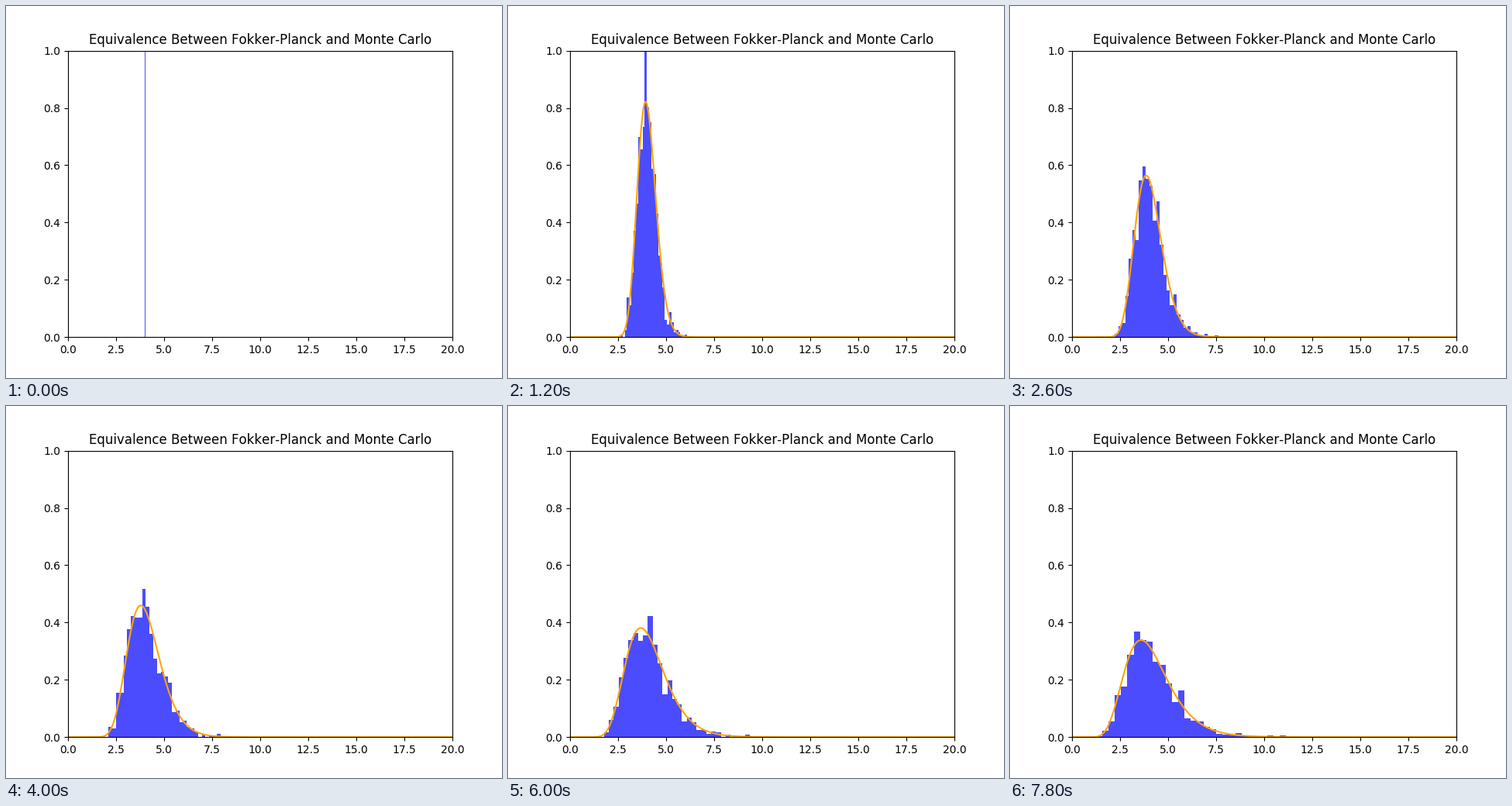
Write a matplotlib script that moves like this. It is 640 px wide and 480 px high and loops after 8000 ms.

```python
import numpy as np
import matplotlib.pyplot as plt
from matplotlib.animation import FuncAnimation

plt.rcParams["text.kerning_factor"] = 6

STEPS, INTERVAL = 40, 200
X0, DRIFT, VOL, DT = 4.0, 0.1, 0.5, 0.01
PATHS, BINS = 1000, 30
BAR = dict(color="blue", alpha=0.7)

x = np.linspace(0.01, 20, 1000)


def log_params(step):
    """Mean and deviation of log X for geometric Brownian motion."""
    t = step * DT
    return np.log(X0) + (DRIFT - VOL**2 / 2) * t, VOL * np.sqrt(t)


def density(x, step):
    """Fokker-Planck solution: a widening log-normal."""
    m, s = log_params(step)
    return np.exp(-((np.log(x) - m) / s) ** 2 / 2) / (x * s * np.sqrt(2 * np.pi))


def draw(step):
    ax.clear()
    if step == 0:
        # All paths still share one value, so the histogram is a hairline.
        ax.axvline(X0, lw=72 / fig.dpi, **BAR)
    else:
        rng = np.random.default_rng(100 + step)
        samples = rng.lognormal(*log_params(step), PATHS)
        ax.hist(samples, bins=BINS, density=True, **BAR)
        ax.plot(x, density(x, step), color="orange")
    ax.set_xlim(0, 20)
    ax.set_ylim(0, 1)
    ax.set_title("Equivalence Between Fokker-Planck and Monte Carlo")


fig, ax = plt.subplots(figsize=(6.4, 4.8), dpi=100)
anim = FuncAnimation(fig, draw, frames=STEPS, interval=INTERVAL,
                     init_func=lambda: draw(0), repeat=True, repeat_delay=0)
plt.show()
```
